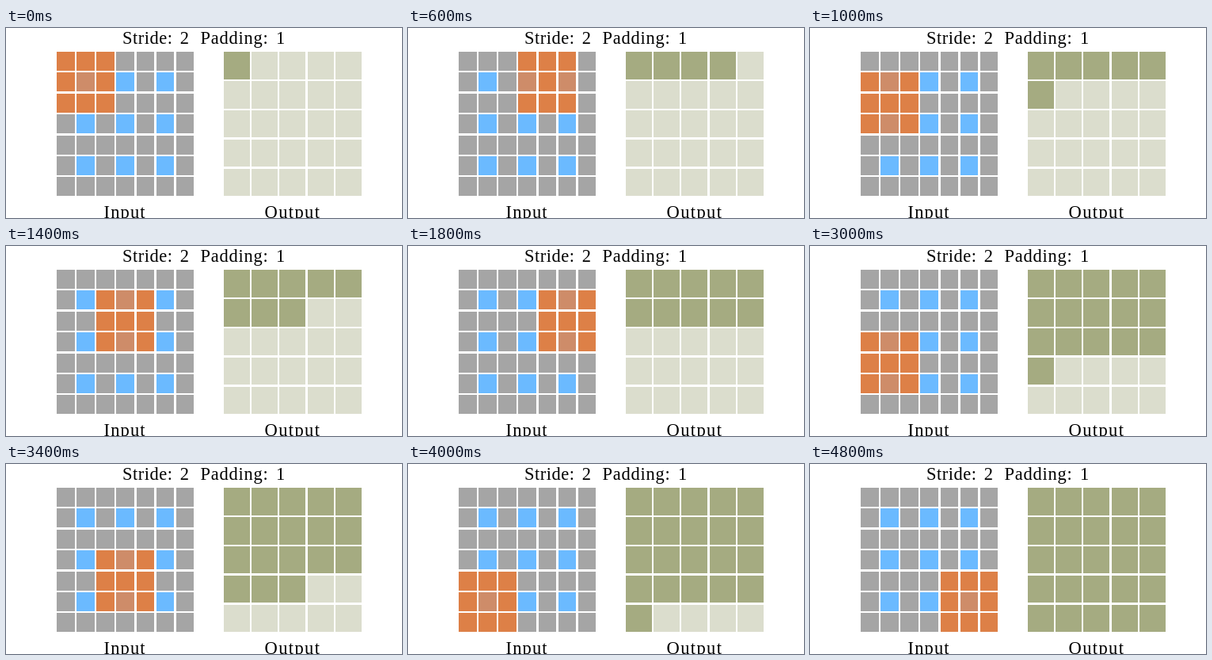
Recreate the animation shown at these times as an HTML page. Size 500x240 px, loop 5 s.

```html
<!DOCTYPE html>
<html lang="en">
<head>
<meta charset="utf-8">
<title>Transposed convolution</title>
<style>
  html, body { margin: 0; width: 100%; height: 100%; overflow: hidden; background: #fff; }
  svg { display: block; width: 500px; height: 240px; }
  text { font: 22.5px "Liberation Serif", "Times New Roman", serif; fill: #000; white-space: pre; }
</style>
</head>
<body>
<svg id="stage" viewBox="0 0 500 240" xmlns="http://www.w3.org/2000/svg">
  <text x="147" y="20" letter-spacing="0.5">Stride:</text>
  <text x="219.7" y="20">2</text>
  <text x="245.5" y="20" letter-spacing="0.74">Padding:</text>
  <text x="341" y="20">1</text>
  <text x="123.5" y="240" letter-spacing="1.14">Input</text>
  <text x="326.5" y="240" letter-spacing="1.4">Output</text>
</svg>
<script>
const STEP = 200;
const SIDE = 5;
const KERNEL = 3;
const GRAY = "#a5a5a5", BLUE = "#6bbaff";
const ORANGE = "#dd8047", ORANGE_ON_BLUE = "#ce8c69";
const OLIVE = "#a5ab81", PALE = "#dbddcd";

const stage = document.getElementById("stage");

// Builds a square grid of cells snapped to whole pixels.
function makeGrid(count, x0, y0, dx, dy, w, h) {
  return Array.from({ length: count * count }, (_, i) => {
    const col = i % count, row = Math.floor(i / count);
    const left = Math.round(x0 + col * dx), right = Math.round(x0 + col * dx + w);
    const top = Math.round(y0 + row * dy), bottom = Math.round(y0 + row * dy + h);
    const rect = document.createElementNS(stage.namespaceURI, "rect");
    rect.setAttribute("x", left);
    rect.setAttribute("y", top);
    rect.setAttribute("width", right - left);
    rect.setAttribute("height", bottom - top);
    stage.appendChild(rect);
    return { rect, col, row };
  });
}

const input = makeGrid(7, 64, 30, 25.14, 26.4, 22.5, 24);
const output = makeGrid(SIDE, 275, 30, 35.2, 36.9, 33, 34.6);

const within = (value, start) => value >= start && value < start + KERNEL;

function draw(time) {
  const step = Math.floor(time / STEP) % (SIDE * SIDE);
  const col = step % SIDE, row = Math.floor(step / SIDE);
  for (const cell of input) {
    const data = cell.col % 2 === 1 && cell.row % 2 === 1;
    const covered = within(cell.col, col) && within(cell.row, row);
    const color = covered ? (data ? ORANGE_ON_BLUE : ORANGE) : (data ? BLUE : GRAY);
    cell.rect.setAttribute("fill", color);
  }
  output.forEach((cell, i) => cell.rect.setAttribute("fill", i <= step ? OLIVE : PALE));
}

const start = performance.now();
function tick() {
  draw(performance.now() - start);
  requestAnimationFrame(tick);
}
tick();
</script>
</body>
</html>
```
